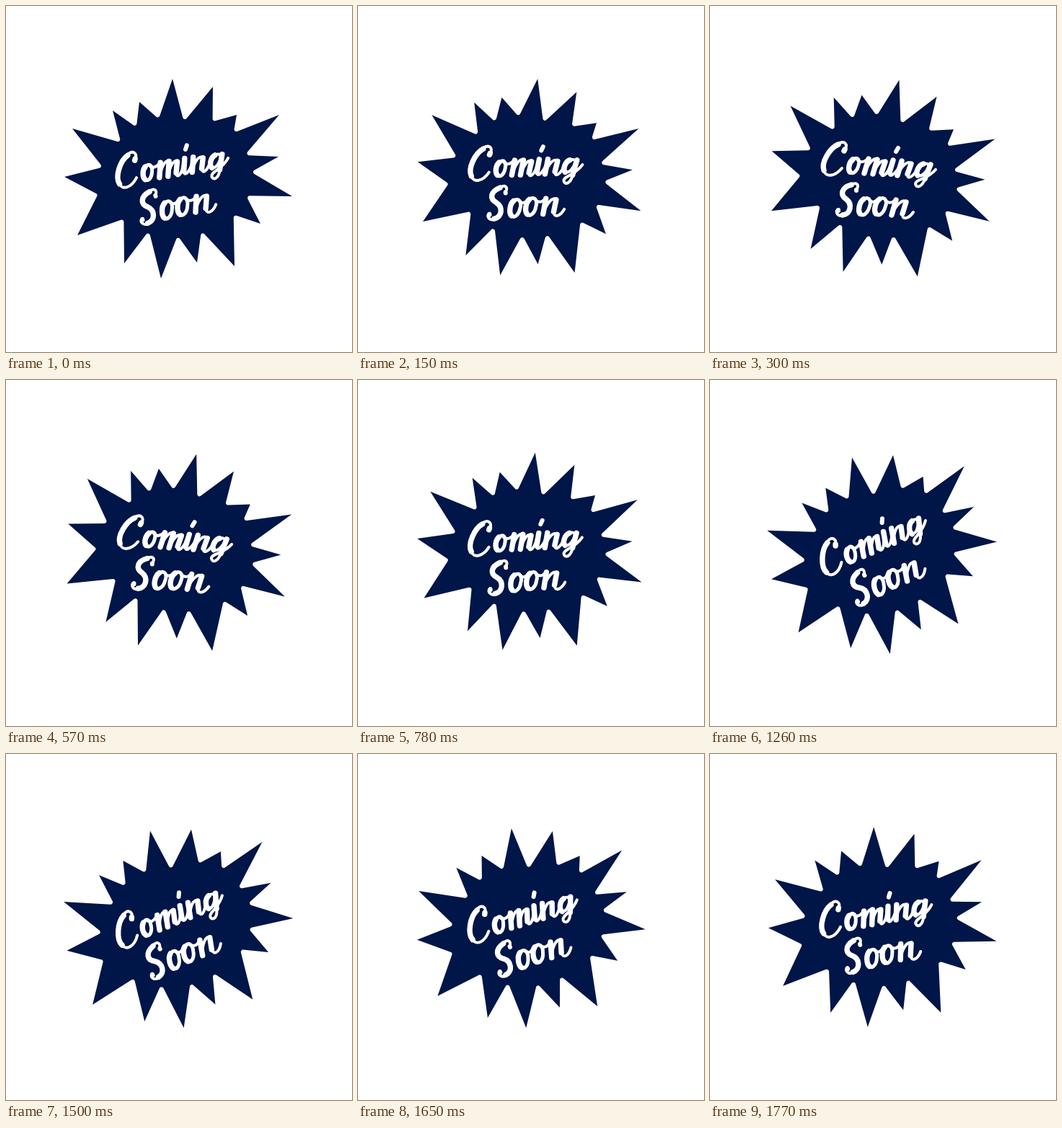
Write an HTML page with a canvas that moves like this. It is 480x480 px and loops after 1.8 s.

```html
<!DOCTYPE html>
<html lang="en">
<head>
<meta charset="utf-8">
<title>Coming Soon</title>
<style>
html, body { margin: 0; width: 100%; height: 100%; overflow: hidden; background: #fff; }
canvas { display: block; }
</style>
</head>
<body>
<canvas id="stage" width="480" height="480" role="img" aria-label="Coming Soon"></canvas>
<script>
const ctx = document.getElementById('stage').getContext('2d');
const LOOP = 1800, STEP = 30, SWING = 15, CENTER = 240;

// Outer tips and the inner corner that follows each, clockwise from the top
const tips = [[231, 101], [287, 112], [320, 151], [379, 151], [378, 209], [397, 264], [353, 302], [317, 361],
  [265, 356], [215, 378], [164, 357], [99, 318], [81, 237], [92, 170], [148, 145], [185, 133]];
const notches = [[247, 158], [288, 158], [318, 174], [334, 206], [343, 230], [336, 264], [318, 291], [272, 314],
  [238, 321], [197, 314], [161, 297], [124, 262], [131, 223], [157, 188], [179, 166], [211, 154]];

// Brush lettering: line width and strokes
const lettering = [
  [7.4, `M178 192C166 197 154 217 158 228 M187 199L186 201
    M198 213C193 217 191 226 194 230
    M220 212L214 232 M232 213L226 233 M243 216L238 231
    M254 214L249 231 M266 215L260 235 M279 219L274 233
    M296 219C289 221 285 231 288 235 M306 220L298 240
    M196 248C182 252 180 262 189 268C198 275 195 289 184 290
    M213 268C207 272 205 284 208 288 M235 268C229 272 227 284 230 288
    M258 269L252 290 M272 272L267 288`],
  [6, 'M261 197L258 202 M203 255L203 256 M178 283L178 284'],
  [5, `M198 213C206 208 208 215 206 221C204 229 198 235 194 230
    M213 268C222 263 224 272 221 279C219 287 212 293 208 288
    M235 268C244 263 246 272 243 279C241 287 234 293 230 288`],
  [4, `M187 200C192 192 187 186 178 191 M158 228C160 238 173 237 183 225
    M205 214Q210 219 218 213
    M214 232C219 220 227 209 232 213 M226 233C231 221 239 211 243 216
    M238 231C237 240 246 234 250 222
    M249 231C248 239 256 234 262 224 M260 235C265 222 275 213 279 219
    M274 233C273 241 280 238 286 229
    M296 219Q303 217 304 223 M288 235C294 238 301 229 304 222
    M298 240C294 252 286 253 285 247C285 240 301 241 313 227
    M203 255C208 247 203 244 195 248 M184 291C176 292 173 284 178 282
    M221 269Q226 275 233 268 M243 269Q249 276 256 270
    M252 290C257 277 268 266 272 272 M267 288C266 297 275 296 282 286`]
].map(([width, d]) => [width, new Path2D(d)]);

function turn(degrees) {
  ctx.translate(CENTER, CENTER);
  ctx.rotate(degrees * Math.PI / 180);
  ctx.translate(-CENTER, -CENTER);
}

function drawBurst() {
  ctx.fillStyle = '#001548';
  ctx.beginPath();
  ctx.moveTo(...tips[0]);
  notches.forEach((notch, i) => {
    const next = tips[(i + 1) % tips.length];
    const inner = notch.map(v => CENTER + (v - CENTER) * 0.97);
    ctx.arcTo(...inner, ...next, 3);
    ctx.lineTo(...next);
  });
  ctx.fill();
}

function drawLettering() {
  ctx.strokeStyle = '#fff';
  ctx.lineCap = ctx.lineJoin = 'round';
  for (const [width, path] of lettering) {
    ctx.lineWidth = width;
    ctx.stroke(path);
  }
}

function draw(now) {
  const t = Math.floor(now / STEP + 0.01) * STEP;
  ctx.setTransform(1, 0, 0, 1, 0, 0);
  ctx.fillStyle = '#fff';
  ctx.fillRect(0, 0, 480, 480);
  turn(SWING * Math.sin(t / LOOP * 2 * Math.PI));
  drawBurst();
  turn(-13); // the lettering is laid out nearly level
  drawLettering();
  requestAnimationFrame(() => draw(performance.now()));
}
draw(performance.now());
</script>
</body>
</html>
```
